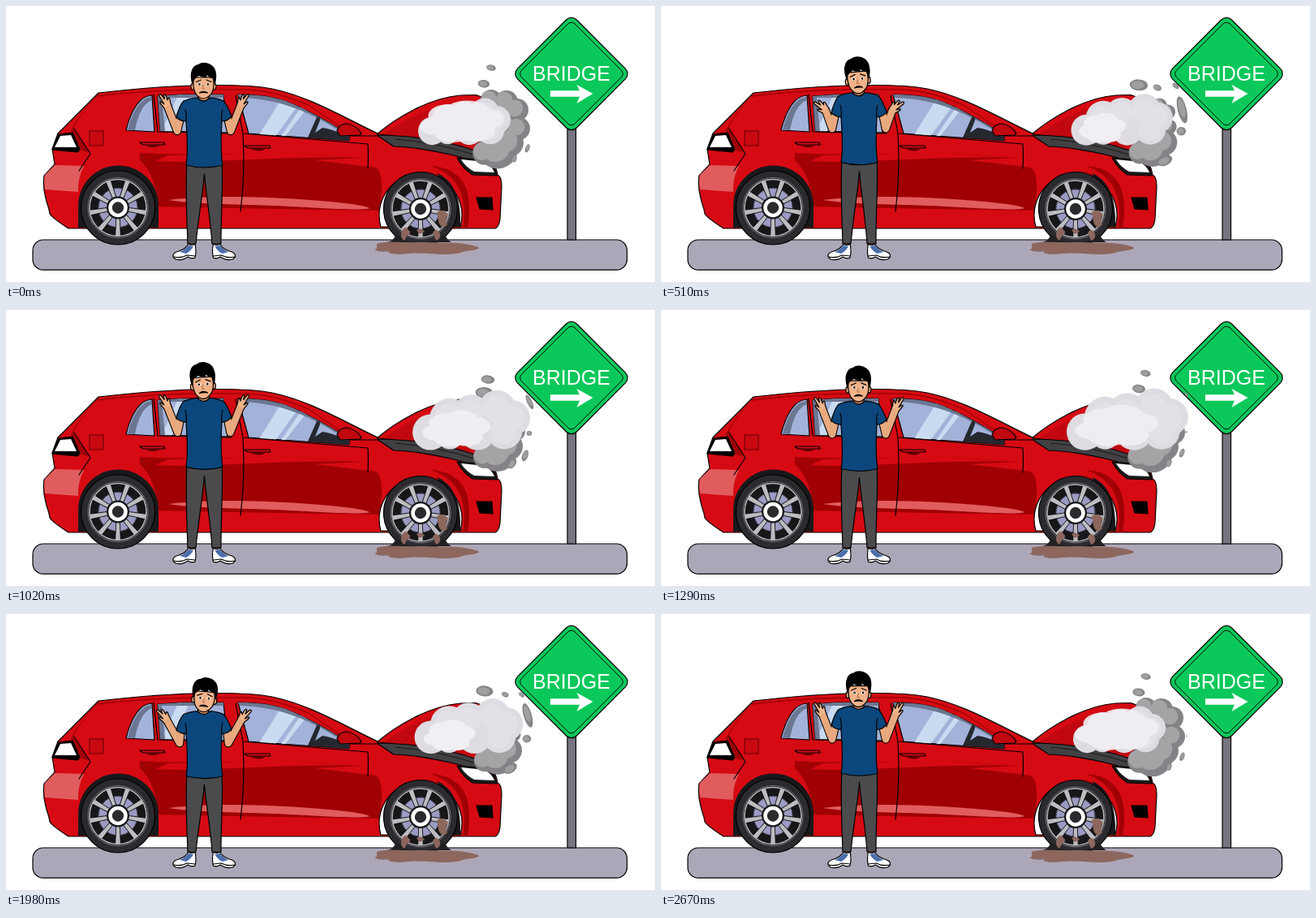
Recreate the animation shown at these times as an HTML page. Size 800 px wide and 340 px high, loop 2700 ms.

```html
<!DOCTYPE html>
<html lang="en">
<head>
<meta charset="utf-8">
<title>Breakdown by the road</title>
<style>
html, body { margin: 0; width: 100%; height: 100%; overflow: hidden; background: #fff; }
svg { display: block; width: 100vw; height: 100vh; }
.ln { stroke: #000; stroke-width: 1.2; stroke-linejoin: round; stroke-linecap: round; }
.no { fill: none; }
</style>
</head>
<body>
<svg viewBox="0 0 800 340" xmlns="http://www.w3.org/2000/svg">
<defs>
  <clipPath id="rearGlass"><path d="M187 111L216 109H268L273 156L190 154Z"/></clipPath>
  <clipPath id="frontGlass"><path d="M286 109C306 109 328 111 344 117C368 126 395 141 423 159V166L299 157Z"/></clipPath>
  <g id="wheel">
    <circle r="45.5" fill="#2b2b2f" class="ln"/>
    <circle r="37" fill="#17171a" stroke="#77777d"/>
    <circle r="24" fill="#9b9bc3" stroke="#55556a"/>
    <g id="spokes"></g>
    <circle r="35" fill="none" stroke="#b5b5ba" stroke-width="1.6"/>
    <circle r="14" fill="#17171a"/>
    <circle r="9.5" fill="#2b2b2f" stroke="#fff" stroke-width="4.6"/>
  </g>
</defs>

<rect x="33" y="288" width="732.5" height="37.2" rx="13" fill="#aca7b8" class="ln"/>

<g id="sign">
  <rect x="692" y="146" width="10.5" height="142" fill="#777580" class="ln"/>
  <g transform="translate(697 83.5) rotate(45)" class="ln">
    <rect x="-51.5" y="-51.5" width="103" height="103" rx="9" fill="#0bc85b"/>
    <rect x="-46.5" y="-46.5" width="93" height="93" rx="6" fill="none" stroke-width=".9"/>
  </g>
  <text x="697" y="91.5" text-anchor="middle" font-family="Liberation Sans, Arial, sans-serif" font-size="25" fill="#fff">BRIDGE</text>
  <path d="M671 104.3H707L703.5 97L723.5 108L703.5 120L707 111.8H671Z" fill="#fff"/>
</g>

<g id="car">
  <path d="M456 159C480 138 522 113 560 110L579 109.5L604 118L600 180L480 168Z" fill="#d60a13" class="ln"/>
  <path d="M464 160C490 139 530 121 570 115L598 122V176L500 168Z" fill="#c1070f"/>
  <path d="M114 107C150 103 190 99 230 98C265 97 303 97 328 102C372 111 410 134 460 158C510 165 563 172 594 187Q604 194 606 208Q611 210 611 222L609 262Q608 272 603 274H77Q57 261 54 256C53 248 50 243 49 237Q45 222 47 209L60 195L57 176L64 157L85 136Z" fill="#d60a13" class="ln"/>
  <path d="M60 196L96 197Q88 213 89 229L48 226Q46 216 48 208Z" fill="#e15c5d"/>
  <path d="M111 111C101 124 91 135 83 151L103 181L93 178L80 153Q92 132 111 111Z" fill="#a00006"/>
  <path d="M84 151L104 182L90 203" class="ln no"/>
  <path d="M65 158L82 156L91 177L88 180L57 177Z" class="ln"/>
  <path d="M67 160L80 159L87 174L60 174Z" fill="#fff"/>
  <path d="M165 181C230 185 305 180 384 183L438 187L380 190L456 199Q468 208 460 252C380 251 270 249 187 247Q186 210 165 190Z" fill="#a00004"/>
  <path d="M184 191C250 195 330 184 440 187L344 181L200 184Z" fill="#d60a13"/>
  <path d="M200 239C245 233 310 235 360 238C407 241 441 245 448 249C440 253 378 248 330 246C282 244 228 244 200 239Z" fill="#e15c5d"/>
  <path d="M111 111C170 104 230 102 290 103C323 103 342 110 373 122L424 157" fill="none" stroke="#a00006" stroke-width="1.4"/>
  <path d="M148 153Q153 133 161 122Q168 111 180 110L183 155Z" fill="#a3b2d9" class="ln"/>
  <path d="M150 152Q155 132 164 121Q170 113 179 112L180 116Q165 121 159 153Z" fill="#6b7791"/>
  <path d="M187 111L216 109H268L273 156L190 154Z" fill="#a3b2d9" class="ln"/>
  <g clip-path="url(#rearGlass)">
    <path d="M214 106L190 158H203L228 106Z" fill="#c9dbf0"/>
    <path d="M186 109H270V113H192L196 154H189Z" fill="#6b7791"/>
  </g>
  <path d="M286 109C306 109 328 111 344 117C368 126 395 141 423 159V166L299 157Z" fill="#a3b2d9" class="ln"/>
  <g clip-path="url(#frontGlass)">
    <path d="M341 112L310 162H331L366 114ZM371 114L338 162H343L377 118Z" fill="#c9dbf0"/>
    <path d="M284 108H310C350 109 400 140 426 158L420 160C390 139 345 114 289 113Z" fill="#6b7791"/>
    <path d="M372 162L383 137Q388 135 387 141L381 156L390 150Q401 151 425 162V168Z" fill="#25282f"/>
  </g>
  <path d="M408 154Q410 145 421 145Q433 148 438 157L436 159L412 160Z" fill="#c1070f" class="ln"/>
  <path d="M423 160H458M182 109L187 155L278 157M283 110L292 157L446 170Q447 184 446 200M292 158Q295 205 289 253" class="ln no"/>
  <rect x="103" y="154" width="17" height="18" fill="#c90910" stroke="#5c0004"/>
  <path d="M165 168H195L196 171H169ZM294 172H325L326 175H298Z" fill="#d60a13" class="ln"/>
  <path d="M172 172Q182 176 190 172ZM302 176Q312 181 320 176Z" fill="#5c0004"/>
  <path d="M457 159C502 159 555 168 588 182Q602 191 604 207L586 194L556 185Q510 174 478 173Z" fill="#414144" class="ln"/>
  <path d="M480 164Q530 168 580 184" fill="none" stroke="#19191b"/>
  <path d="M556 187L592 190Q603 197 605 209L575 208Q562 199 556 187Z" fill="#1a1a1c" class="ln"/>
  <path d="M561 189L590 192Q599 197 602 205L577 204Q566 198 561 189Z" fill="#fff"/>
  <path d="M580 236H599L600 251L584 250Z" class="ln"/>
  <path d="M563 274Q569 244 557 222Q545 203 522 197Q556 198 567 224Q574 246 569 274Z" fill="#a00004"/>
  <path d="M89 273V246A49.5 49.5 0 0 1 188 246V273Z" fill="#18181a"/>
  <path d="M462 272A51 51 0 1 1 560 272Z" fill="#fff" class="ln"/>
  <path d="M532 206Q562 220 560 272H550Z" fill="#18181a"/>
  <use href="#wheel" x="138" y="248.5"/>
  <use href="#wheel" x="511" y="250"/>
  <path d="M470 291Q479 289 480 281Q511 303 541 281Q543 288 549 291Z" fill="#202022"/>
  <g fill="#8d675d">
    <path d="M457 293C470 289 492 292 513 291C540 292 563 290 582 297C586 301 569 301 560 304C538 309 520 303 496 305C480 307 468 305 472 302C462 304 450 301 457 299Z"/>
    <path d="M531 254Q539 249 545 257Q540 264 544 270Q535 275 533 265Z"/>
    <path d="M488 277Q493 269 496 276Q501 279 495 282L491 289Q485 285 488 277ZM506 276Q512 272 516 278L510 281ZM526 279Q531 272 535 281Q536 287 530 289Z"/>
  </g>
</g>

<g id="smoke"><g id="dark"></g><g id="bits"></g><g id="back"></g><g id="front"></g></g>

<g id="man">
  <g id="shoe">
    <path d="M225 290H232V299H225Z" fill="#e2a178" class="ln"/>
    <path d="M206 309Q205 304 213 302Q222 299 225 293Q229 296 233 293Q235 302 233 310Q229 312 224 309Q218 314 209 312Z" fill="#fff" class="ln"/>
    <path d="M214 303L222 305Q228 302 231 296L225 295Q221 300 214 303Z" fill="#4a6fae"/>
    <path d="M207 309Q216 311 223 307L233 308" class="no ln"/>
  </g>
  <use href="#shoe" transform="translate(488.5) scale(-1 1)"/>
  <g id="body">
    <path d="M223 192H266C268 220 265 245 265 293H254C252 262 247 235 244.5 207C242 235 237 262 234 293H224C223 260 221 225 223 192Z" fill="#4b4b4d" class="ln"/>
    <g id="arm">
      <path id="limbEdge" fill="none" stroke="#000" stroke-width="10.6" stroke-linejoin="round"/>
      <g id="hand">
        <path d="M-4.5 2C-5 -2 -6 -4 -6 -8Q-5 -10 -3.8 -7L-2.5 -4L-2.6 -16Q-1 -19 .3 -15L1 -9L2.8 -14Q5 -15 4.6 -11L3.6 -6L6 -8Q8 -7 5.5 -3L4.5 2Z" fill="#efb48b" class="ln"/>
      </g>
      <path id="limb" fill="none" stroke="#e9a97f" stroke-width="8.4" stroke-linejoin="round"/>
    </g>
    <use href="#arm" transform="translate(488) scale(-1 1)"/>
    <path d="M235 113Q244 119 252 113Q262 114 268 117Q273 122 278 136Q273 142 266 142C265 160 264 178 267 196Q244 202 222 196C225 178 223 160 222 142Q215 142 210 137Q214 122 219 117Q226 114 235 113Z" fill="#0b477c" class="ln"/>
    <path d="M222 142Q223 134 221 128M266 142Q265 134 267 128" class="ln no" stroke-width=".8"/>
    <g id="head">
      <path d="M237 106H250V114Q244 120 237 114Z" fill="#d18f68" class="ln"/>
      <ellipse cx="230.5" cy="99" rx="2.5" ry="4" fill="#e9a97f" class="ln"/>
      <ellipse cx="256.5" cy="99" rx="2.5" ry="4" fill="#e9a97f" class="ln"/>
      <path d="M231 88H256Q257 103 253 108Q248 114 243.5 114Q238 114 234 108Q230 102 231 88Z" fill="#f0b289" class="ln"/>
      <path d="M230 98Q226 86 229 79Q231 73 237 72Q242 68 250 71Q258 74 259 83Q260 91 257 98L254.5 89Q250 88 247 85L248 88Q241 88 238 86Q234 88 232 91Z"/>
      <path d="M234.5 93.5L240.5 91M247 91L253 93.5" class="ln no"/>
      <g id="eye"><ellipse cx="238.5" cy="96.5" rx="2.5" ry="1.6" fill="#fff"/><circle cx="238.5" cy="96.5" r="1.3"/></g>
      <use href="#eye" x="10.5"/>
      <path d="M243.5 97L242 102H245" fill="none" stroke="#a8643f" stroke-width=".9"/>
      <path d="M238.5 107Q243 103.500 248.5 107Q244 106 238.5 107Z" fill="#6a2520" class="ln"/>
    </g>
  </g>
</g>
</svg>

<script>
const LOOP = 2700, STEP = 30, TAU = Math.PI * 2;
const $ = id => document.getElementById(id);
const mod = (a, n) => ((a % n) + n) % n;

// Mixes rows of [time, ...values] at time q, eased between rows.
function track(keys, q) {
  if (q <= keys[0][0]) return keys[0].slice(1);
  for (let i = 1; i < keys.length; i++) {
    const a = keys[i - 1], b = keys[i];
    if (q > b[0]) continue;
    const k = (q - a[0]) / (b[0] - a[0]), e = k * k * (3 - 2 * k);
    return a.slice(1).map((v, j) => v + (b[j + 1] - v) * e);
  }
  return keys[keys.length - 1].slice(1);
}

const puffs = (list, fill) => list.map(([x, y, r]) =>
  `<circle cx="${x}" cy="${y}" r="${r}" fill="${fill}"/>`).join("");

for (let i = 0; i < 9; i++) {
  $("spokes").innerHTML +=
    `<path d="M-2.3 -12L-3.3 -35H3.3L2.3 -12Z" fill="#bcbcc1" stroke="#000" stroke-width=".8" transform="rotate(${i * 40 + 20})"/>`;
}

const backPuffs = [[524, 152, 20], [546, 137, 23], [570, 131, 21], [599, 126, 21],
  [616, 136, 20], [607, 151, 20], [577, 152, 20], [546, 155, 16]];
$("back").innerHTML = puffs(backPuffs, "#dedce2") +
  puffs(backPuffs.slice(1, 6).map(([x, y, r]) => [x - 1, y, r * .72]), "#e3e1e7");

const CLOUD = [[-.62, .22, .38], [-.3, -.25, .5], [.12, -.35, .56], [.55, -.1, .45],
  [.3, .42, .48], [-.2, .42, .5], [0, 0, .6]];
const cloud = (x, y, rx, ry, alpha) =>
  `<g transform="translate(${x} ${y}) scale(${rx} ${ry})" opacity="${alpha}">${puffs(CLOUD, "#f1eff3")}</g>`;

// phase, x, y, rx, ry, alpha
const FRONT = [[.05, 533, 153, 6, 5, 0], [.2, 537, 152, 25, 19, .85], [.378, 544, 150, 29, 20, 1],
  [.578, 551, 148, 36, 22, 1], [1, 562, 142, 52, 28, .9], [1.18, 566, 140, 58, 30, 0]];

// born, life, start x y, end x y, size, flatness, turn, spin
const BITS = [
  [.12, 1.2, 587, 102, 604, 62, 13, .62, 0, 15],
  [.05, .65, 603, 104, 626, 95, 8, .7, 0, 40],
  [.1, .9, 641, 134, 648, 102, 21, .33, 84, -25],
  [.15, .85, 640, 155, 648, 150, 7, .9, 0, 0],
  [.15, 1.15, 620, 191, 630, 186, 11, .62, -5, -100],
  [.5, .85, 638, 182, 648, 168, 9, .5, 110, 0],
  [.5, .75, 590, 106, 588, 88, 14, .65, 0, 10],
  [.3, .45, 634, 98, 640, 104, 5, .6, 40, 0]
];

function bit([born, life, x0, y0, x1, y1, size, flat, turn, spin], p) {
  const k = (p - born) / life;
  if (k <= 0 || k >= 1) return "";
  const e = k ** 1.4, r = size * Math.min(1, k / .15) * (1 - k) ** .6;
  const oval = (m, fill) => `<ellipse rx="${r * m}" ry="${r * flat * m}" cx="${r * (m - 1) * .4}" fill="${fill}"/>`;
  return `<g transform="translate(${x0 + (x1 - x0) * e} ${y0 + (y1 - y0) * e}) rotate(${turn + spin * k})">` +
    oval(1, "#858387") + oval(.7, "#a09ea1") + "</g>";
}

const REST = [211, 154, 199, 123, -30];
// phase, elbow x y, wrist x y, hand turn
const ARM = [[0, ...REST], [.1, 213, 154, 196, 126, -60], [.2, 214, 155, 200, 128, -56],
  [.378, 211, 156, 203, 134, -52], [.467, 214, 154, 198, 124, -40], [.5, 214, 154, 195, 122, -56],
  [.578, 212, 155, 199, 124, -32], [.956, ...REST]];

function drawSmoke(t, q) {
  const c = Math.cos(TAU * t / LOOP);
  $("back").setAttribute("transform",
    `translate(${504 + 4 * c} 166) scale(${1 - .136 * c} ${1 - .14 * c}) translate(-504 -166)`);

  const [g] = track([[0, 1], [.2, .92], [.38, .3], [.55, .15], [.95, 1]], q);
  const low = 1 + .06 * Math.cos(TAU * q), near = .7 + .3 * g;
  const side = [[598, 116, 13], [617, 118, 14], [630, 128, 14], [632, 151, 14]].map(([x, y, r]) =>
    [606 + (x - 606) * near, 140 + (y - 140) * near, r * (.5 + .5 * g)]);
  const base = [[606, 176, 23 * low], [590, 181, 14 * low], [620, 168, 17 * low]];
  const all = [...side, ...base];
  $("dark").innerHTML = puffs(all, "#858387") +
    puffs(all.map(([x, y, r]) => [x - 3, y - 2, r * .74]), "#a5a3a6");

  let bits = "", white = "";
  for (const p of [q, q + 1]) {
    for (const b of BITS) bits += bit(b, p);
    if (p >= .05 && p <= 1.18) white = cloud(...track(FRONT, p)) + white;
  }
  $("bits").innerHTML = bits;
  $("front").innerHTML = white;
}

function drawMan(t, q) {
  const s = Math.sin(TAU * t / LOOP);
  $("body").setAttribute("transform", `translate(0 300) scale(1 ${1 + .036 * s}) translate(0 -300)`);
  $("head").setAttribute("transform", `rotate(${-5 * s} 244 108)`);
  const [ex, ey, wx, wy, turn] = track(ARM, q);
  const d = `M216 133L${ex} ${ey}L${wx} ${wy}`;
  $("limb").setAttribute("d", d);
  $("limbEdge").setAttribute("d", d);
  $("hand").setAttribute("transform", `translate(${wx} ${wy}) rotate(${turn})`);
}

function draw(now) {
  const t = Math.floor(mod(now, LOOP) / STEP) * STEP;
  const q = mod(t / (LOOP / 2), 1);
  drawSmoke(t, q);
  drawMan(t, q);
}

let start = null;
function tick(now) {
  if (start === null) start = now;
  draw(now - start);
  requestAnimationFrame(tick);
}
draw(0);
requestAnimationFrame(tick);
</script>
</body>
</html>
```
